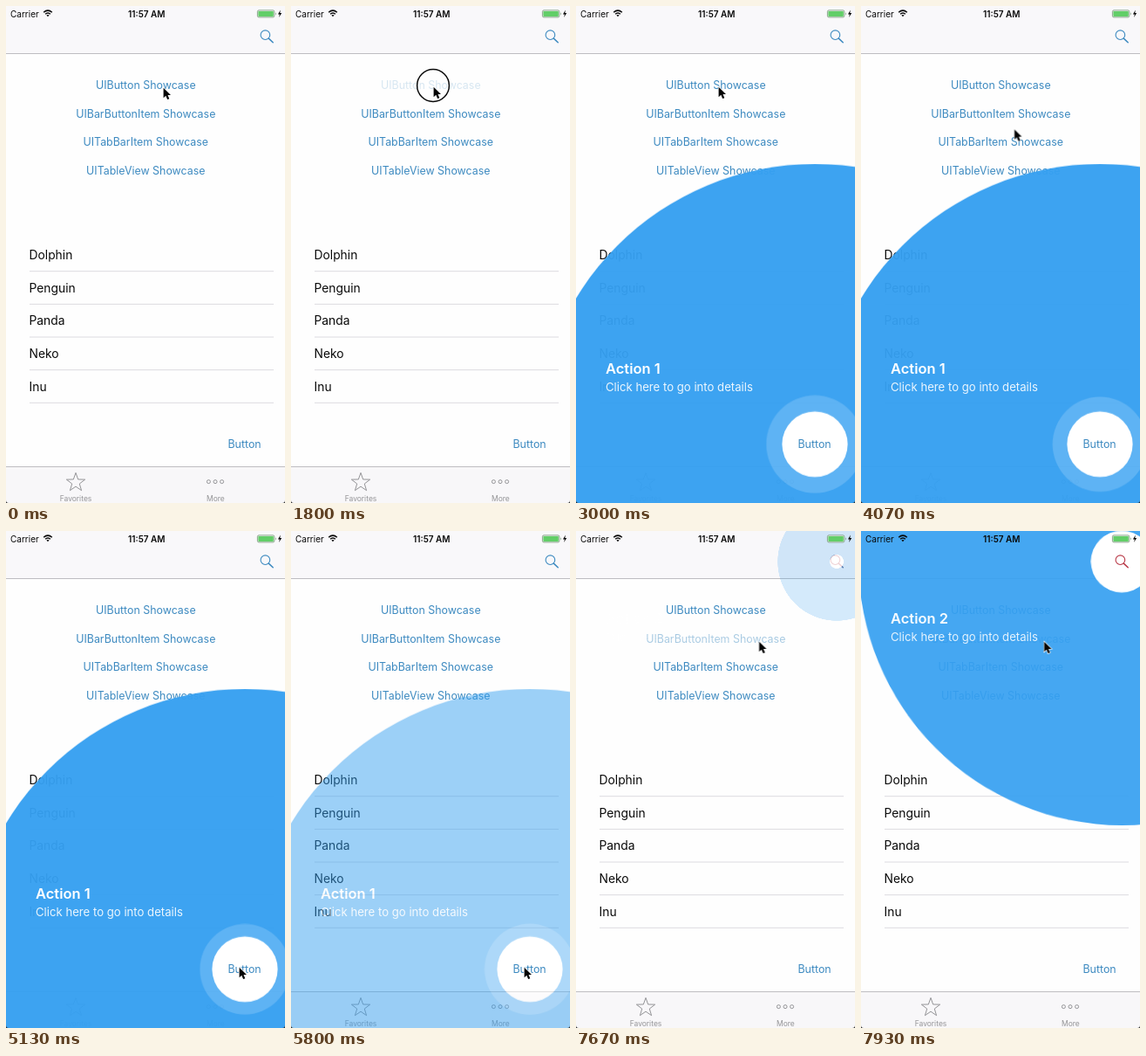
An HTML page that plays this animation: 320x569 px, repeating every 8 s.

```html
<!DOCTYPE html>
<html lang="en">
<head>
<meta charset="utf-8">
<title>Showcase demo</title>
<style>
  html, body { margin: 0; width: 100%; height: 100%; overflow: hidden; background: #fefefe; }
  svg { display: block; width: 100%; height: 100%; }
  text { font-family: Inter, Roboto, sans-serif; }

  .link { font-size: 12.42px; fill: #3d8ac0; text-anchor: middle; }
  .row { font-size: 13.85px; fill: #0a0a0a; }
  .tab { font-size: 8.5px; fill: #949497; text-anchor: middle; }
  .title { font-size: 16.5px; font-weight: 600; fill: #fff; }
  .detail { font-size: 13.17px; fill: #fff; fill-opacity: .9; }
  .status { font-size: 10px; fill: #080808; }
  .disc { fill: #36a0f1; fill-opacity: .96; }
  .holder { fill: #fff; }
  .separator { stroke: #dcdbe0; }
  .edge { stroke: #bebdc1; }
  .icon { fill: none; stroke: #949497; }

  /* One loop is 8 s, so 1% is 80 ms. */
  .grow1, .show1, .fade1, .grow2, .show2, .press1, .press2, .cursor, .ring, .pulse {
    animation: 8s linear infinite;
  }
  .grow1 { animation-name: grow1; }
  .show1 { animation-name: show1; }
  .fade1 { animation-name: fade1; }
  .grow2 { animation-name: grow2; }
  .show2 { animation-name: show2; }
  .press1 { animation-name: press1; }
  .press2 { animation-name: press2; }
  .cursor { animation-name: travel; }
  .ring { animation-name: ring; }
  .pulse { animation-name: pulse; }
  .ripple { fill: #fff; animation: ripple .5s -.537s ease-in-out infinite alternate; }

  @keyframes grow1 {
    0%, 24.54% { transform: scale(0); animation-timing-function: ease-in-out; }
    30.79%, 100% { transform: scale(1); }
  }
  @keyframes show1 {
    0%, 24.54% { opacity: 0; animation-timing-function: ease-in-out; }
    30.79%, 100% { opacity: 1; }
  }
  @keyframes fade1 {
    0%, 69.4% { opacity: 1; animation-timing-function: ease-in-out; }
    75.65%, 100% { opacity: 0; }
  }
  @keyframes pulse {
    0%, 30.78% { opacity: 0; }
    30.79%, 100% { opacity: .17; }
  }
  @keyframes ripple {
    from { transform: scale(1); }
    to { transform: scale(1.49); }
  }
  @keyframes grow2 {
    0%, 93.94% { transform: scale(0); animation-timing-function: ease-in-out; }
    100% { transform: scale(.98); }
  }
  @keyframes show2 {
    0%, 93.94% { opacity: 0; animation-timing-function: ease-in-out; }
    100% { opacity: 1; }
  }
  @keyframes press1 {
    0%, 21.62% { opacity: 1; }
    21.63%, 24.13% { opacity: .2; }
    29%, 100% { opacity: 1; }
  }
  @keyframes press2 {
    0%, 91.24% { opacity: 1; }
    91.25%, 93.63% { opacity: .2; }
    100% { opacity: .9; }
  }
  @keyframes ring {
    0%, 21.62%, 24.14%, 66.62%, 69.01%, 91.24%, 93.64%, 100% { opacity: 0; }
    21.63%, 24.13%, 66.63%, 69%, 91.25%, 93.63% { opacity: 1; }
  }
  @keyframes travel {
    0%, 3% { transform: translate(180px, 92px); animation-timing-function: ease-in-out; }
    11%, 48% { transform: translate(163px, 91px); animation-timing-function: ease-in-out; }
    60%, 76.4% { transform: translate(267px, 498px); animation-timing-function: ease-in-out; }
    82.4%, 86% { transform: translate(217px, 132px); animation-timing-function: ease-in-out; }
    89%, 100% { transform: translate(209.5px, 125px); }
  }
</style>
</head>
<body>
<svg viewBox="0 0 320 569" preserveAspectRatio="none">
  <defs>
    <g id="lens" fill="none" stroke-width="1.1" stroke-linecap="round">
      <circle cx="297.4" cy="33.2" r="5.3"/>
      <path d="M301.3 37.1L306.2 41.8" stroke-width="1.5"/>
    </g>
  </defs>

  <rect width="320" height="569" fill="#fefefe"/>
  <rect width="320" height="54.5" fill="#f9f8fa"/>
  <path class="edge" d="M0 54.5H320"/>
  <use href="#lens" stroke="#3d8ac0"/>

  <text class="link press1" x="160.3" y="95.3">UIButton Showcase</text>
  <text class="link press2" x="160.3" y="127.8">UIBarButtonItem Showcase</text>
  <text class="link" x="160.3" y="160.3">UITabBarItem Showcase</text>
  <text class="link" x="160.3" y="192.7">UITableView Showcase</text>
  <g id="list"></g>
  <text class="link" x="273.6" y="506.3">Button</text>

  <rect y="527.5" width="320" height="41.5" fill="#f8f7f9"/>
  <path class="edge" d="M0 527.5H320"/>
  <path id="star" class="icon" stroke-linejoin="round"/>
  <g class="icon">
    <circle cx="232.4" cy="544.6" r="2"/>
    <circle cx="240" cy="544.6" r="2"/>
    <circle cx="247.6" cy="544.6" r="2"/>
  </g>
  <text class="tab" x="80" y="566.8">Favorites</text>
  <text class="tab" x="240.4" y="566.8">More</text>

  <g class="fade1">
    <g transform="translate(274 501.7)">
      <g class="show1"><circle class="disc grow1" r="321"/></g>
      <g class="pulse"><circle class="ripple" r="37.6"/></g>
      <circle class="holder grow1" r="37.6"/>
    </g>
    <g class="show1">
      <text class="title" x="34" y="421">Action 1</text>
      <text class="detail" x="34" y="440.8">Click here to go into details</text>
      <text class="link" x="273.6" y="506.3">Button</text>
    </g>
  </g>

  <g transform="translate(299 35)">
    <g class="show2"><circle class="disc grow2" r="321"/></g>
    <circle class="holder grow2" r="37.6"/>
  </g>
  <g class="show2">
    <text class="title" x="34" y="106.4">Action 2</text>
    <text class="detail" x="34" y="126.2">Click here to go into details</text>
    <use href="#lens" stroke="#b5303f"/>
  </g>

  <text class="status" x="5" y="12.6">Carrier</text>
  <text class="status" x="161.3" y="12.6" text-anchor="middle" font-weight="600">11:57 AM</text>
  <g fill="none" stroke="#080808" stroke-width="1.5">
    <path d="M43.2 7.3Q48 2.9 52.8 7.3M45.1 9.3Q48 6.7 50.9 9.3"/>
    <path d="M46.4 10.6Q48 9.3 49.6 10.6L48 12.3Z" fill="#080808" stroke="none"/>
  </g>
  <rect x="288.4" y="4.9" width="19.4" height="8" rx="1.6" fill="#eef6ee" stroke="#6f8f70" stroke-width=".8"/>
  <rect x="289.4" y="5.9" width="17.4" height="6" rx=".6" fill="#62ce68"/>
  <path d="M309 7.2Q310.6 8.9 309 10.6Z" fill="#6f8f70"/>
  <path d="M314.9 4.6L311.9 9.4H313.9L313.1 13L316.2 8.1H314.2Z" fill="#080808"/>
  <path d="M0 566Q0 569 3 569H0ZM320 566Q320 569 317 569H320Z" fill="#222"/>

  <g class="cursor">
    <circle class="ring" r="18.4" fill="none" stroke="#0a0a0a" stroke-width="1.5"/>
    <path d="M.6 1.7V13.3L3.3 10.8L5.1 15.1L7.3 14.2L5.5 10H9Z" fill="#050505" stroke="#fff" stroke-width="1.2" paint-order="stroke"/>
  </g>
</svg>
<script>
  const rowGap = 37.65;
  document.getElementById('list').innerHTML = ['Dolphin', 'Penguin', 'Panda', 'Neko', 'Inu']
    .map((name, i) => `
      <text class="row" x="26.5" y="${290 + i * rowGap}">${name}</text>
      <path class="separator" d="M27 ${303.7 + i * rowGap}H307"/>`)
    .join('');

  const starPoint = (_, i) => {
    const angle = i * Math.PI / 5;
    const radius = i % 2 ? 4.5 : 11.2;
    return [80 + radius * Math.sin(angle), 545.6 - radius * Math.cos(angle)];
  };
  document.getElementById('star')
    .setAttribute('d', `M${Array.from({ length: 10 }, starPoint).join('L')}Z`);
</script>
</body>
</html>
```
